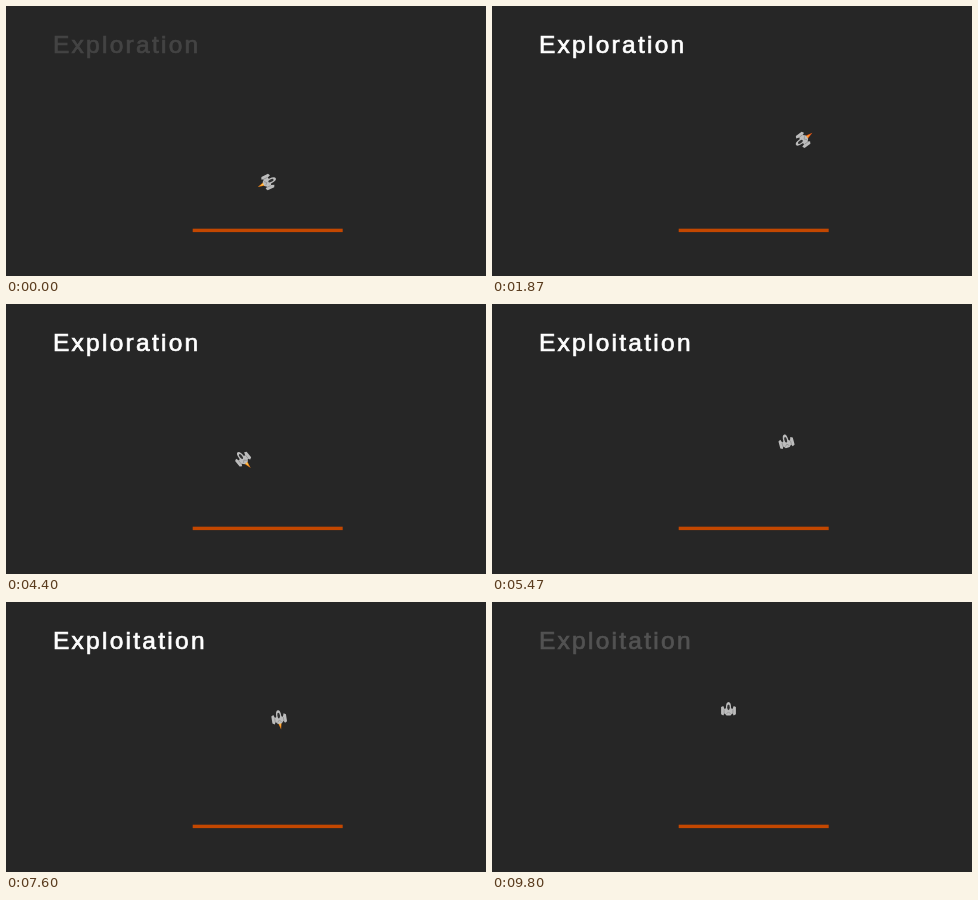
Animation, 480 px wide and 270 px high, one loop 9.87 s. Source, as an HTML page:

```html
<!DOCTYPE html>
<html lang="en">
<head>
<meta charset="utf-8">
<title>Exploration and exploitation</title>
<style>
  html, body { margin: 0; width: 100%; height: 100%; overflow: hidden; background: #262626; }
  svg { display: block; width: 100vw; height: 100vh; }
  text {
    font: 24.5px "Liberation Sans", Arial, sans-serif; letter-spacing: 2.26px;
    fill: #fff; stroke: #fff; stroke-width: .7px;
  }
</style>
</head>
<body>
<svg viewBox="0 0 480 270">
  <rect width="480" height="270" fill="#262626"/>
  <rect x="186.7" y="222.7" width="150" height="3.4" fill="#c34700"/>
  <text id="label" x="47" y="47"></text>
  <g id="ship">
    <g id="flame">
      <path id="outer" d="M-1.9 4H1.9L.3 11.4Z"/>
      <path id="inner" d="M-1 4H1L.1 8.5Z"/>
    </g>
    <path d="M-7.4-3.4L-5.2-4.6L-4-1.4L-2.6-2.2Q-2.6-8.6 0-8.6T2.6-2.2L4-1.4L5.2-4.6L7.4-3.4V3.8L5.2 5L4 2.8L2 5H-2L-4 2.8L-5.2 5L-7.4 3.8Z" fill="#bcbcbc"/>
    <path d="M-4.4-1V3M4.4-1V3M-2 3.4L0 1.4L2 3.4" fill="none" stroke="#8a8a8a" stroke-width=".7"/>
    <ellipse cy="-3.2" rx="1.3" ry="2.9" fill="#303030"/>
  </g>
</svg>
<script>
const FPS = 15, FRAMES = 148, MID = 4.92, FADE = 0.5;
const $ = id => document.getElementById(id);
const label = $("label"), ship = $("ship"), flame = $("flame"), outer = $("outer"), inner = $("inner");

// Key poses: [seconds, x, y, degrees clockwise from up]
const poses = [
  [0, 262, 176, 65],
  [.6, 291, 178, 130],
  [1.1, 242, 178, 40],
  [1.5, 266, 88, 95],
  [1.867, 311, 134, 234],
  [2.2, 330, 180, 300],
  [2.65, 178, 110, 325],
  [3.067, 251, 110.5, 405],
  [3.7, 208, 166, 330],
  [4.4, 237, 155, 321],
  [4.75, 230, 202, 370],
  [5.45, 294, 140, 345],
  [6, 273, 112, 367],
  [6.667, 284.5, 118.5, 356],
  [8.533, 257.5, 113.2, 350],
  [9.8, 236.5, 108.5, 360]
];

// Smooth curve through unevenly timed poses, for column c
function sample(t, c) {
  const last = poses.length - 1;
  let i = 0;
  while (i < last - 1 && poses[i + 1][0] <= t) i++;
  const slope = k => {
    const a = poses[Math.max(k - 1, 0)], b = poses[Math.min(k + 1, last)];
    return (b[c] - a[c]) / (b[0] - a[0]);
  };
  const a = poses[i], b = poses[i + 1], d = b[0] - a[0];
  const u = Math.min(1, (t - a[0]) / d), v = 1 - u;
  return v * v * ((1 + 2 * u) * a[c] + u * d * slope(i)) +
         u * u * ((3 - 2 * u) * b[c] - v * d * slope(i + 1));
}

function draw(ms) {
  const n = Math.floor((ms + 4) * FPS / 1000) % FRAMES;
  const t = n / FPS;

  const first = t < MID;
  const age = first ? t + .067 : t - MID;
  const left = (first ? MID : 9.9) - t;
  label.textContent = first ? "Exploration" : "Exploitation";
  label.setAttribute("opacity", Math.max(0, Math.min(1, age / FADE, left / FADE)));

  const [x, y, turn] = [1, 2, 3].map(c => sample(t, c));
  ship.setAttribute("transform", `translate(${x} ${y}) rotate(${turn})`);

  const hot = n % 4 === 0 && n > 0;
  flame.setAttribute("visibility", n % 5 === 2 ? "hidden" : "visible");
  flame.setAttribute("transform", `translate(0 ${Math.sin(n * 2.3) * .5})`);
  outer.setAttribute("fill", hot ? "#ef5a16" : "#f58a1c");
  inner.setAttribute("fill", hot ? "#ffab35" : "#ffd05a");
}

function tick() {
  draw(performance.now());
  requestAnimationFrame(tick);
}
draw(0);
requestAnimationFrame(tick);
</script>
</body>
</html>
```
